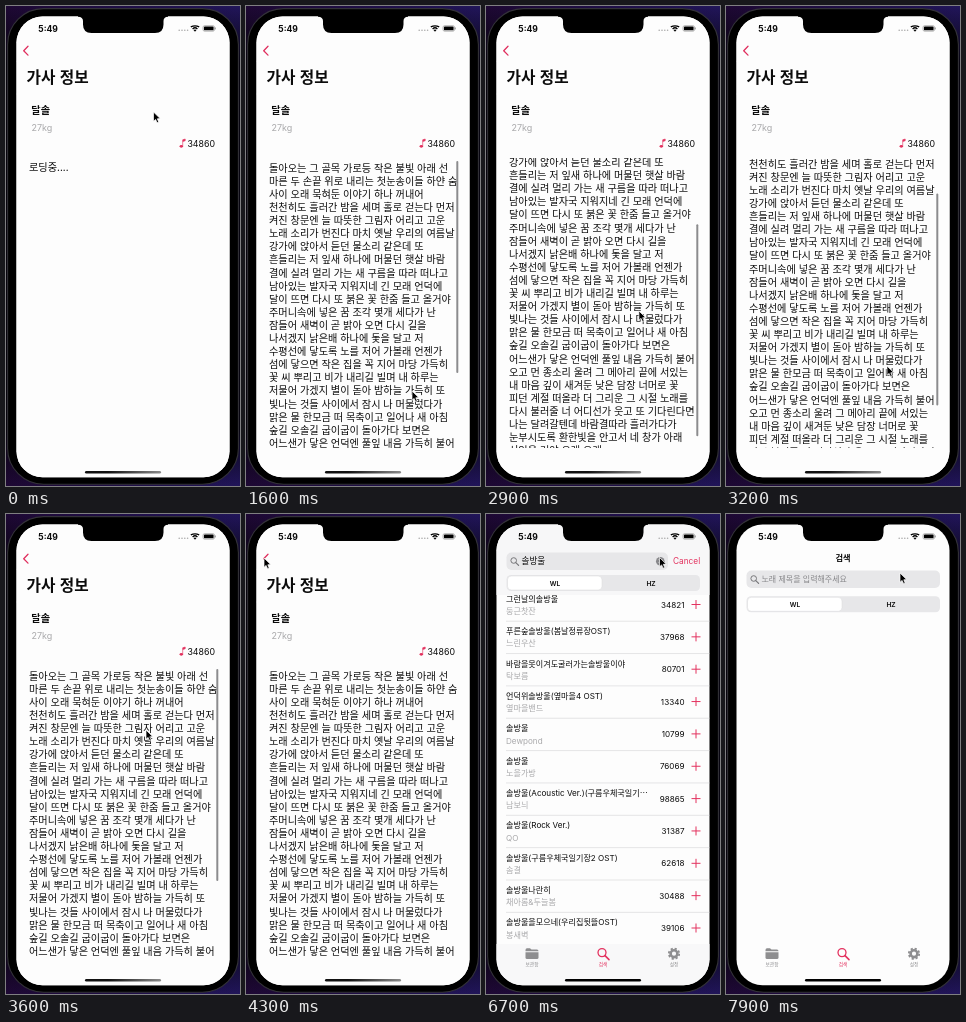
An HTML page that plays this animation: 234x480 px, repeating every 8 s.

```html
<!DOCTYPE html>
<html lang="ko">
<head>
<meta charset="utf-8">
<title>가사 정보</title>
<style>
html, body { margin: 0; width: 100%; height: 100%; overflow: hidden; background: #000; }
svg { display: block; width: 234px; height: 480px; }
text { font-family: Inter, "Noto Sans CJK KR", "Noto Sans CJK", sans-serif; fill: #0b0b0b; white-space: pre; }
.ko { font-family: "Noto Sans CJK KR", "Noto Sans CJK", sans-serif; }
</style>
</head>
<body>
<svg id="stage" viewBox="0 0 234 480" xmlns="http://www.w3.org/2000/svg">
  <defs>
    <linearGradient id="wall">
      <stop offset="0" stop-color="#1e0834"/><stop offset="1" stop-color="#21155a"/>
    </linearGradient>
    <linearGradient id="shade" x1="0" y1="0" x2="0" y2="1">
      <stop offset="0" stop-color="#050409" stop-opacity="0"/><stop offset=".12" stop-color="#050409" stop-opacity=".9"/>
      <stop offset=".88" stop-color="#050409" stop-opacity=".9"/><stop offset="1" stop-color="#050409" stop-opacity="0"/>
    </linearGradient>
    <linearGradient id="barFade">
      <stop offset=".3" stop-color="#111"/><stop offset="1" stop-color="#8a8a8a"/>
    </linearGradient>
    <clipPath id="screen"><rect x="10.5" y="10.6" width="213" height="460.6" rx="26"/></clipPath>
    <clipPath id="lyricBox"><rect x="11" y="152" width="212" height="290"/></clipPath>
    <clipPath id="listBox"><rect x="11" y="81" width="213" height="349"/></clipPath>
  </defs>
  <rect width="234" height="480" fill="url(#wall)"/>
  <rect width="234" height="480" fill="url(#shade)"/>
  <rect x="1.600" y="2.600" width="230.800" height="475.600" rx="36" fill="#000" stroke="#333238" stroke-width="1.100"/>
  <g clip-path="url(#screen)">
    <rect x="10" y="10" width="215" height="462" fill="#fdfdfd"/>
    <g id="home">
      <g id="library"></g>
      <g id="search"></g>
      <g id="tabs"></g>
    </g>
    <g id="detail">
      <rect x="10" y="10" width="215" height="462" fill="#fdfdfd"/>
      <path d="M22 40.300 17.700 44.700 22 49.100" fill="none" stroke="#e0305f" stroke-width="1.300" stroke-linecap="round" stroke-linejoin="round"/>
    </g>
    <g id="status"></g>
    <rect id="bar" x="79" y="465" width="76" height="2.600" rx="1.300"/>
  </g>
  <path d="M72 9.500H162V10.800Q157.500 11 157.500 15V18.500Q157.500 27 149 27H85.500Q77 27 77 18.500V15Q77 11 72 10.800Z"/>
  <path id="cursor" d="M0 0V9.300L2.100 7.400 3.600 10.700 5.200 10 3.800 6.800 6.700 6.600Z" stroke="#fff" stroke-width=".7" stroke-linejoin="round"/>
</svg>
<script>
const NS = 'http://www.w3.org/2000/svg';
const PINK = '#e3325f', GRAY = '#8e8e90', PALE = '#a9a9ab';
const LOOP = 8000, STEP = 100;
const SONG = '달솔', SINGER = '27kg', WORD = '솔방울';
const $ = id => document.getElementById(id);

function add(parent, tag, attrs, content) {
  const el = document.createElementNS(NS, tag);
  for (const k in attrs) el.setAttribute(k, attrs[k]);
  if (content) el.textContent = content;
  parent.appendChild(el);
  return el;
}
// y is the middle of the letters
const label = (g, str, x, y, size, extra = {}) =>
  add(g, 'text', { x, y: y + size * 0.36, 'font-size': size, ...extra }, str);
const rule = (g, x1, x2, y) =>
  add(g, 'path', { d: `M${x1} ${y}H${x2}`, stroke: '#d4d4d6', 'stroke-width': 0.6 });
const place = (el, x, y) => el.setAttribute('transform', `translate(${x} ${y})`);
const fade = (el, v) => el.setAttribute('opacity', v);
const BOLD = { 'font-weight': 700 }, MID = { 'text-anchor': 'middle' }, END = { 'text-anchor': 'end' };

function lens(g, x, y, r, color, width) {
  add(g, 'circle', { cx: x, cy: y, r, fill: 'none', stroke: color, 'stroke-width': width });
  add(g, 'path', { d: `M${x + r * .75} ${y + r * .75}l${r} ${r}`, stroke: color, 'stroke-width': width * 1.2, 'stroke-linecap': 'round' });
}

// status bar
const status = $('status');
label(status, '5:49', 32.3, 22.5, 8.6, { 'font-weight': 700 });
for (let i = 0; i < 4; i++) add(status, 'circle', { cx: 173.2 + i * 2.8, cy: 24.3, r: 0.8, fill: '#aaa' });
[[4.2, 20.9], [2.4, 22.9]].forEach(([w, y]) =>
  add(status, 'path', { d: `M${189 - w} ${y}Q189 ${y - 2.2} ${189 + w} ${y}`, fill: 'none', stroke: '#000', 'stroke-width': 1.3 }));
add(status, 'path', { d: 'M187.5 24.1Q189 23 190.5 24.1L189 25.7Z' });
add(status, 'rect', { x: 197, y: 19.7, width: 11.5, height: 5.5, rx: 1.6, fill: 'none', stroke: '#888', 'stroke-width': 0.6 });
add(status, 'rect', { x: 197.9, y: 20.6, width: 9.7, height: 3.7, rx: 0.9 });
add(status, 'path', { d: 'M209.3 21.5V23.4', stroke: '#888', 'stroke-width': 0.9 });

// lyric page
const LYRICS = `돌아오는 그 골목 가로등 작은 불빛 아래 선
마른 두 손끝 위로 내리는 첫눈송이들 하얀 숨
사이 오래 묵혀둔 이야기 하나 꺼내어
천천히도 흘러간 밤을 세며 홀로 걷는다 먼저
켜진 창문엔 늘 따뜻한 그림자 어리고 고운
노래 소리가 번진다 마치 옛날 우리의 여름날
강가에 앉아서 듣던 물소리 같은데 또
흔들리는 저 잎새 하나에 머물던 햇살 바람
결에 실려 멀리 가는 새 구름을 따라 떠나고
남아있는 발자국 지워지네 긴 모래 언덕에
달이 뜨면 다시 또 붉은 꽃 한줌 들고 올거야
주머니속에 넣은 꿈 조각 몇개 세다가 난
잠들어 새벽이 곧 밝아 오면 다시 길을
나서겠지 낡은배 하나에 돛을 달고 저
수평선에 닿도록 노를 저어 가볼래 언젠가
섬에 닿으면 작은 집을 꼭 지어 마당 가득히
꽃 씨 뿌리고 비가 내리길 빌며 내 하루는
저물어 가겠지 별이 돋아 밤하늘 가득히 또
빛나는 것들 사이에서 잠시 나 머물렀다가
맑은 물 한모금 떠 목축이고 일어나 새 아침
숲길 오솔길 굽이굽이 돌아가다 보면은
어느샌가 닿은 언덕엔 풀잎 내음 가득히 불어
오고 먼 종소리 울려 그 메아리 끝에 서있는
내 마음 깊이 새겨둔 낮은 담장 너머로 꽃
피던 계절 떠올라 더 그리운 그 시절 노래를
다시 불러줄 너 어디선가 웃고 또 기다린다면
나는 달려갈텐데 바람결따라 흘러가다가
눈부시도록 환한빛을 안고서 네 창가 아래
서있을 거야 오래 오래`.split('\n');
const detail = $('detail');
label(detail, '가사 정보', 20.5, 71.5, 15.7, { ...BOLD, class: 'ko' });
label(detail, SONG, 25.3, 104.5, 10.2, { ...BOLD, class: 'ko' });
label(detail, SINGER, 25.5, 121.7, 9, { style: 'fill:' + PALE });
add(detail, 'ellipse', { cx: 175.3, cy: 140.3, rx: 1.7, ry: 1.4, fill: PINK });
add(detail, 'path', { d: 'M176.7 140.3V133.8L179.2 133V134.8L176.7 135.6', fill: PINK, stroke: PINK, 'stroke-width': 0.6 });
label(detail, '34860', 209, 137.5, 8.8, END);
const loading = label(detail, '로딩중....', 23, 161.5, 10.2, { class: 'ko' });
const lyricBox = add(detail, 'g', { 'clip-path': 'url(#lyricBox)' });
const lyrics = add(lyricBox, 'g', {});
LYRICS.forEach((line, i) => label(lyrics, line, 23, 162.1 + i * 13.1, 10.18, { class: 'ko' }));
const thumb = add(detail, 'rect', { x: 210.3, width: 2, rx: 1, fill: '#8c8c8e' });

// saved songs
const library = $('library');
add(library, 'circle', { cx: 105, cy: 43, r: 3.3, fill: '#f6d873' });
add(library, 'rect', { x: 103.5, y: 45.6, width: 3, height: 3, rx: 1, fill: '#a5a39a' });
label(library, '보관함', 113, 44.5, 8.2, { ...BOLD, class: 'ko' });
rule(library, 20, 218, 55.3);
label(library, SONG, 20, 66, 8.2, { class: 'ko' });
label(library, SINGER, 20, 78, 8, { style: 'fill:' + PALE });
label(library, '34860', 214, 72, 8.4, END);
rule(library, 20, 218, 88);

// search page
const SONGS = [
  ['그런날의솔방울', '둥근찻잔', 34821],
  ['푸른숲솔방울(봄날정류장OST)', '느린우산', 37968],
  ['바람을못이겨도굴러가는솔방울이야', '탁보름', 80701],
  ['언덕위솔방울(옆마을4 OST)', '옆마을밴드', 13340],
  [WORD, 'Dewpond', 10799],
  [WORD, '노을가방', 76069],
  [WORD + '(Acoustic Ver.)(구름우체국일기⋯', '남보늬', 98865],
  [WORD + '(Rock Ver.)', 'QO', 31387],
  [WORD + '(구름우체국일기장2 OST)', '솜결', 62618],
  ['솔방울나란히', '채아롬&두늘봄', 30488],
  ['솔방울을모으네(우리집뒷뜰OST)', '봉새벽', 39106]
];
const search = $('search');
const results = add(search, 'g', {});
const list = add(results, 'g', { 'clip-path': 'url(#listBox)' });
SONGS.forEach(([name, singer, code], i) => {
  const y = 85 + i * 32.35;
  label(list, name, 20, y, 8.1);
  label(list, singer, 20, y + 12.2, 8.1, { style: 'fill:' + PALE });
  label(list, String(code), 198.5, y + 5.7, 8.1, END);
  add(list, 'path', { d: `M205.5 ${y + 5.5}h9m-4.5 -4.5v9`, stroke: PINK, 'stroke-width': 1 });
  rule(list, 20, 224, y + 22.2);
});
add(results, 'rect', { x: 10, y: 10, width: 215, height: 71, fill: '#f7f7f8' });
add(results, 'rect', { x: 10, y: 430, width: 215, height: 42, fill: '#f8f8f9' });
const heading = label(search, '검색', 117, 44.5, 8.2, { ...BOLD, ...MID, class: 'ko' });
const field = add(search, 'g', {});
const fieldBox = add(field, 'rect', { x: 20.5, y: 38.5, height: 17.5, rx: 5, fill: '#e7e7e9' });
lens(field, 27.7, 46.5, 2.8, '#77777a', 1);
const hint = label(field, '노래 제목을 입력해주세요', 35.5, 47.2, 8, { class: 'ko', style: 'fill:#88888b' });
const typed = add(field, 'g', {});
label(typed, WORD, 35.5, 47.2, 8.6, { class: 'ko' });
add(typed, 'circle', { cx: 174.3, cy: 47.2, r: 4.3, fill: '#87878a' });
add(typed, 'path', { d: 'M172.7 45.6l3.2 3.2m0 -3.2l-3.2 3.2', stroke: '#eee', 'stroke-width': 0.8 });
const cancel = label(search, 'Cancel', 187, 47, 8.3, { style: 'fill:' + PINK });
const segment = add(search, 'g', {});
add(segment, 'rect', { x: 20.5, y: 61, width: 193.5, height: 16, rx: 4.5, fill: '#e7e7e9' });
add(segment, 'rect', { x: 21.5, y: 62, width: 94.5, height: 14, rx: 3.8, fill: '#fff', stroke: '#d9d9db', 'stroke-width': 0.5 });
label(segment, 'WL', 69, 69.2, 6.6, { ...MID, 'font-weight': 600 });
label(segment, 'HZ', 165, 69.2, 6.6, { ...MID, 'font-weight': 600 });

// tab bar, drawn in currentColor
const tabs = ['보관함', '검색', '설정'].map((name, i) => {
  const x = 46 + i * 71, g = add($('tabs'), 'g', {}), c = 'currentColor';
  if (i === 0) {
    add(g, 'path', { d: 'M39.5 436Q39.5 434.3 41 434.3H44L45.5 435.6H51Q52.5 435.6 52.5 437.3H39.5Z', fill: c });
    add(g, 'path', { d: 'M39.5 438.2H52.5V443.5Q52.5 445 51 445H41Q39.5 445 39.5 443.5Z', fill: c });
  } else if (i === 1) {
    lens(g, x - 1, 438.6, 4, c, 1.3);
  } else {
    add(g, 'circle', { cx: x, cy: 439.7, r: 3.4, fill: 'none', stroke: c, 'stroke-width': 2.6 });
    add(g, 'circle', { cx: x, cy: 439.7, r: 5.2, fill: 'none', stroke: c, 'stroke-width': 1.8, 'stroke-dasharray': '2.2 1.884' });
  }
  label(g, name, x, 450.7, 4.7, { ...MID, class: 'ko', style: 'fill:currentColor' });
  return g;
});

// keys are [time, ...values]; each leg is eased
const CURSOR = [
  [0, 147.5, 106], [900, 151, 112], [1300, 166, 385], [1600, 166, 385], [2200, 150, 268],
  [2500, 148.5, 275], [2700, 148.5, 275], [3200, 161, 360], [3300, 161, 360], [3600, 140, 216],
  [4200, 18, 44], [4350, 18, 44], [4800, 125, 149], [5150, 125, 149], [5550, 115, 439],
  [5700, 115, 439], [6050, 150, 62], [6600, 173.5, 43.5], [6900, 173.5, 43.5],
  [7150, 197, 46], [7300, 197, 46], [7700, 174, 61], [7900, 174, 59]
];
const SCROLL = [[1600, 0], [2300, 106.5], [2700, 106.5], [3200, 43.3], [3500, 0]];
const clamp = v => Math.min(1, Math.max(0, v));
const ease = v => v * v * (3 - 2 * v);

function at(keys, t) {
  const i = keys.findIndex(k => k[0] > t);
  if (i < 0) return keys[keys.length - 1].slice(1);
  if (i === 0) return keys[0].slice(1);
  const a = keys[i - 1], b = keys[i], p = ease((t - a[0]) / (b[0] - a[0]));
  return a.slice(1).map((v, n) => v + (b[n + 1] - v) * p);
}

function draw(t) {
  place($('cursor'), ...at(CURSOR, t));

  const loaded = t >= 1000;
  fade(loading, loaded ? 0 : 1);
  fade(lyricBox, loaded ? 1 : 0);
  $('bar').setAttribute('fill', t < 4350 ? 'url(#barFade)' : '#000');
  const [s] = at(SCROLL, t);
  place(lyrics, 0, -s);
  const top = 155 + s * 0.75;
  thumb.setAttribute('y', top);
  thumb.setAttribute('height', Math.min(440, top + 212) - top);
  fade(thumb, clamp((t - 1500) / 100) * clamp((4100 - t) / 300));

  // page pops to the right while the one below follows
  const left = t < 4350 ? 1 : t > 5000 ? 0 : Math.exp(-7.7 * (t - 4350) / 1000);
  place(detail, 214 * (1 - left), 0);
  fade(detail, left > 0.01 ? 1 : 0);
  place($('home'), -64 * left, 0);

  const searching = t >= 5650, cleared = t >= 7000;
  fade(library, searching ? 0 : 1);
  fade(search, searching ? 1 : 0);
  tabs.forEach((g, i) => g.setAttribute('color', i === (searching ? 1 : 0) ? PINK : GRAY));
  fade(results, cleared ? 0 : 1);
  fade(typed, cleared ? 0 : 1);
  fade(hint, cleared ? 1 : 0);

  const shut = ease(clamp((t - 7200) / 300));
  place(field, 0, 18 * shut);
  place(segment, 0, 21.3 * shut);
  fieldBox.setAttribute('width', 161.5 + 32 * shut);
  fade(cancel, 1 - shut);
  fade(heading, shut);
}

function tick() {
  draw(Math.floor(performance.now() % LOOP / STEP) * STEP);
  requestAnimationFrame(tick);
}
tick();
</script>
</body>
</html>
```
